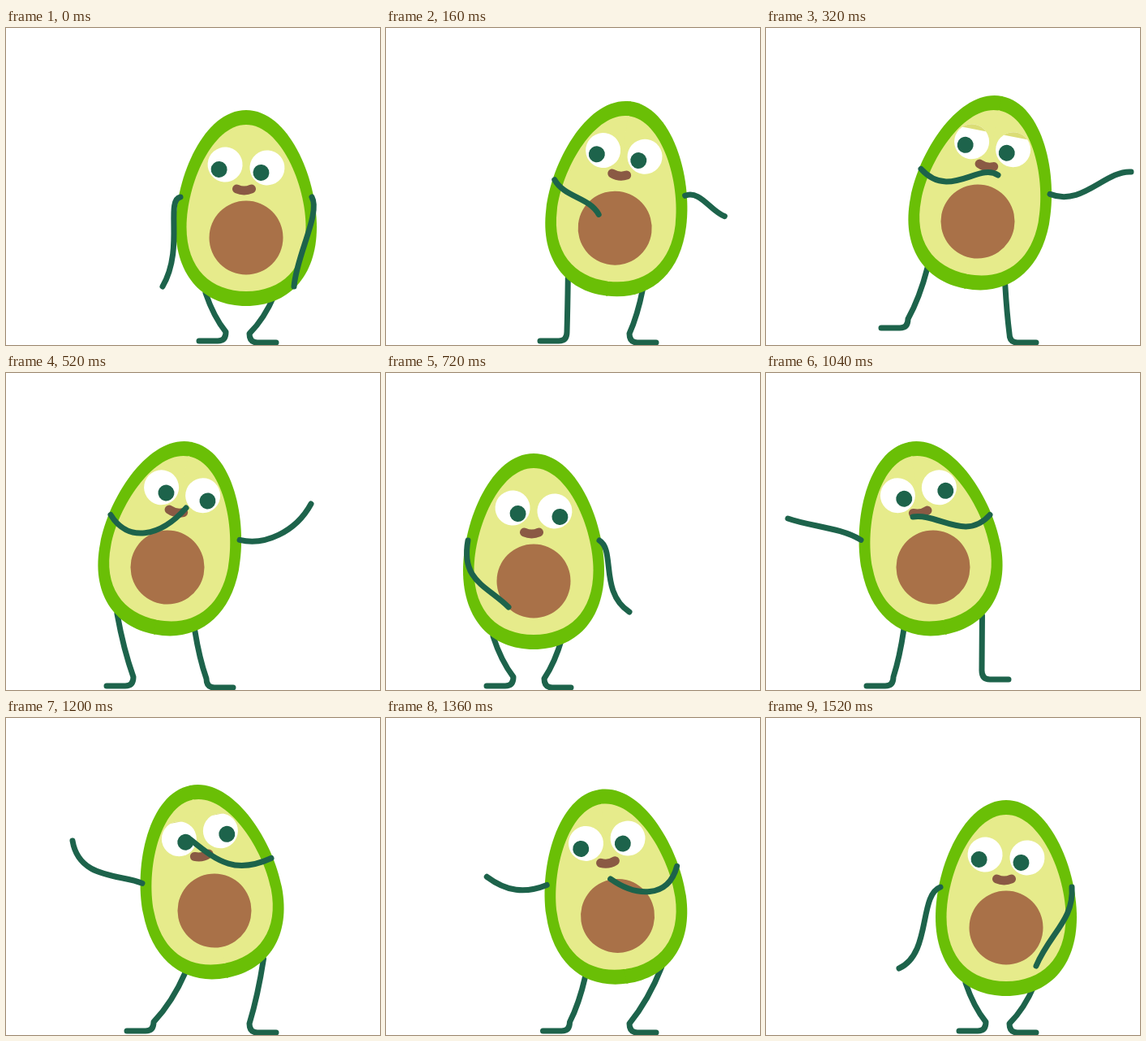
An HTML page with a canvas for the animation above (1560 ms loop, 461 by 390 pixels).

```html
<!DOCTYPE html>
<html>
<head>
<meta charset="utf-8">
<style>
  html, body { margin: 0; width: 100%; height: 100%; overflow: hidden; background: #fff; }
  canvas { display: block; }
</style>
</head>
<body>
<canvas id="stage" width="461" height="390"></canvas>
<script>
const ctx = document.getElementById('stage').getContext('2d');
const LOOP = 1560, HALF = LOOP / 2, STEP = 40, MIRROR = 478;
const GREEN = '#6abf06', FLESH = '#e6eb8b', PIT = '#a97148', DARK = '#1d634b', MOUTH = '#8a5a44', LID = '#dbdd76';

// Half a dance cycle: time, body [x, y, tilt], then two control points and the hand of each arm.
const halfCycle = [
  [0, [296, 258, 0], [196, 212, 220, 272, 193, 318], [388, 228, 358, 280, 355, 318]],
  [260, [272, 239, 11], [232, 208, 266, 172, 297, 177], [386, 190, 423, 189, 451, 179]],
  [320, [261, 238, 11], [226, 212, 262, 165, 286, 181], [390, 220, 418, 175, 450, 177]],
  [420, [221, 237, 11], [194, 192, 216, 178, 250, 150], [336, 192, 388, 199, 396, 151]],
  [520, [199, 239, 11], [150, 209, 190, 202, 222, 166], [318, 213, 357, 196, 376, 161]],
  [720, [182, 256, 0], [92, 256, 125, 262, 151, 288], [283, 218, 263, 270, 300, 294]],
  [740, [182, 258, 0], [98, 248, 128, 265, 145, 305], [290, 218, 274, 290, 314, 308]]
];
const flip = arm => arm.map((v, i) => i % 2 ? v : MIRROR - v);
const mirrored = ([t, [x, y, tilt], left, right]) =>
  [t + HALF, [MIRROR - x, y, -tilt], flip(right), flip(left)];
const dance = [...halfCycle, ...halfCycle.map(mirrored)].map(key => key.flat());

// Toe positions: time, x.
const leftToe = [[0, 238], [260, 160], [320, 142], [400, 124], [1100, 124], [1200, 149], [1520, 238]];
const rightToe = [[0, 333], [320, 333], [520, 280], [720, 228], [780, 225], [1040, 299], [1180, 333]];

const clamp = (v, lo, hi) => Math.max(lo, Math.min(hi, v));
const bump = (t, peak, width) => Math.max(0, 1 - ((t - peak) / width) ** 2);

// Periodic interpolation; smooth uses tangents from the neighbouring keys.
function sample(keys, t, smooth) {
  const n = keys.length;
  const at = i => {
    const turn = Math.floor(i / n), key = keys[i - turn * n];
    return [key[0] + turn * LOOP, ...key.slice(1)];
  };
  let i = n - 1;
  while (keys[i][0] > t) i--;
  const p = at(i - 1), a = at(i), b = at(i + 1), q = at(i + 2);
  const span = b[0] - a[0], u = (t - a[0]) / span;
  return a.slice(1).map((v, j) => {
    const k = j + 1;
    if (!smooth) return v + (b[k] - v) * u;
    const m0 = (b[k] - p[k]) / (b[0] - p[0]) * span;
    const m1 = (q[k] - v) / (q[0] - a[0]) * span;
    const ease = u * u * (3 - 2 * u);
    return v + (b[k] - v) * ease + u * (1 - u) * ((1 - u) * m0 - u * m1);
  });
}

function stroke(path, color, width) {
  ctx.strokeStyle = color;
  ctx.lineWidth = width;
  ctx.lineCap = ctx.lineJoin = 'round';
  ctx.stroke(new Path2D(path));
}

function egg(top, bottom, side, crown, color) {
  const half = s => `C${s * crown} ${top} ${s * side} ${top / 2 + 4} ${s * side} -13
    C${s * side} ${bottom * .58} ${s * side * .59} ${bottom} 0 ${bottom}`;
  ctx.fillStyle = color;
  for (const s of [-1, 1]) ctx.fill(new Path2D(`M0 ${top} ${half(s)} L${-s} ${bottom} L${-s} ${top}`));
}

function disc(x, y, r, color) {
  ctx.fillStyle = color;
  ctx.beginPath();
  ctx.arc(x, y, r, 0, 7);
  ctx.fill();
}

function leg([hipX, hipY], toeX, toeY, side) {
  const heel = toeX - 33 * side;
  stroke(`M${hipX} ${hipY} Q${hipX * .6 + heel * .4} ${(hipY + toeY) / 2} ${heel} ${toeY - 11}
    Q${heel} ${toeY} ${heel + 10 * side} ${toeY} L${toeX} ${toeY}`, DARK, 7);
}

function arm(shoulder, curve) {
  stroke(`M${shoulder.join(' ')} C${curve.join(' ')}`, DARK, 7);
}

function eye(x, look, lookY, lid) {
  disc(x, 0, 21.5, '#fff');
  if (lid > 0) {
    ctx.save();
    ctx.clip();
    ctx.fillStyle = LID;
    ctx.fillRect(x - 22, -22, 44, lid);
    ctx.restore();
  }
  disc(x + look, lookY, 10, DARK);
}

function draw(t) {
  const [x, y, tilt, ...arms] = sample(dance, t, true);
  const angle = tilt * Math.PI / 180, c = Math.cos(angle), s = Math.sin(angle);
  const onBody = (dx, dy) => [x + dx * c - dy * s, y + dx * s + dy * c];
  const stretch = Math.min(1, Math.abs(tilt) / 11);
  const beat = t % HALF, first = t < HALF;
  const look = (first ? 7 : -7) * clamp((beat - 470) / 40, -1, 1);
  const lid = 7 * bump(beat, 345, 85);
  const lift = 16 * bump(beat, 315, 90);

  ctx.fillStyle = '#fff';
  ctx.fillRect(0, 0, 461, 390);
  leg(onBody(-50, 68), sample(leftToe, t)[0], 385 - (first ? lift : 0), -1);
  leg(onBody(35 + 13 * stretch, 70), sample(rightToe, t)[0], 387 - (first ? 0 : lift), 1);

  ctx.save();
  ctx.translate(x, y);
  ctx.rotate(angle);
  egg(-157, 84, 87, 52, GREEN);
  egg(-139, 66, 73.5, 42, FLESH);
  disc(0, 0, 45.5, PIT);

  ctx.save();
  ctx.translate(0, -88 - 7 * stretch);
  ctx.rotate(.075 * (1 - stretch));
  eye(-26, look, 6.5 - stretch, lid);
  eye(26, look, 6.5 - stretch, lid);
  ctx.restore();

  ctx.translate(-2.5, -59 - 10 * stretch);
  stroke('M-9 -1 Q0 3 9 -1', MOUTH, 11);
  ctx.restore();

  arm(onBody(-81, -50), arms.slice(0, 6));
  arm(onBody(81, -50), arms.slice(6));
}

function tick() {
  draw(Math.floor(performance.now() % LOOP / STEP) * STEP);
  requestAnimationFrame(tick);
}
tick();
</script>
</body>
</html>
```
